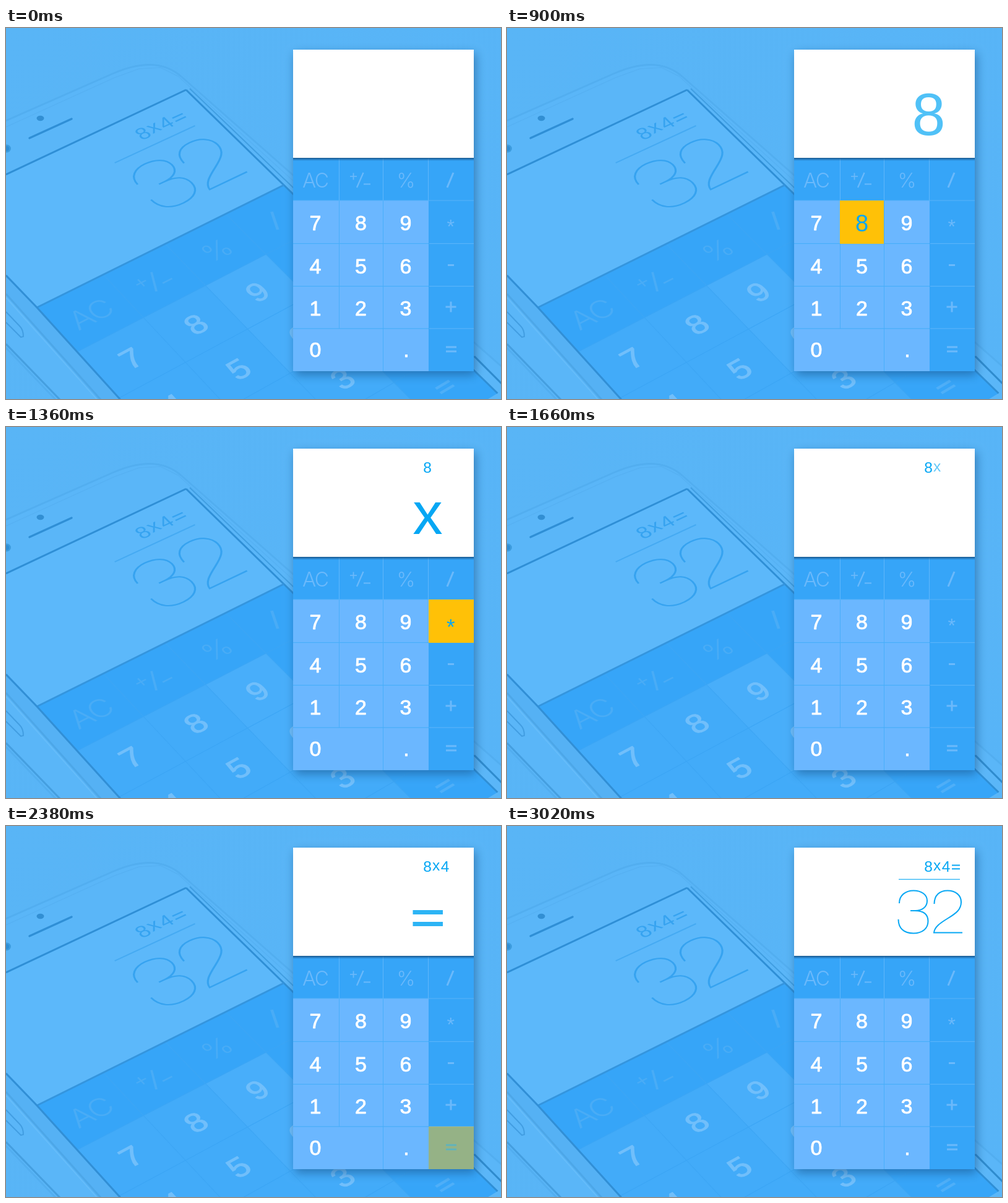
Write an HTML page with a canvas that moves like this. It is 800 px wide and 600 px high and loops after 3580 ms.

```html
<!DOCTYPE html>
<html lang="en">
<head>
<meta charset="utf-8">
<title>Calculator</title>
<style>
html, body { margin: 0; width: 100%; height: 100%; overflow: hidden; background: #58b5f7; }
canvas { display: block; width: 800px; height: 600px; }
</style>
</head>
<body>
<canvas id="stage" width="800" height="600"></canvas>
<script>
const SANS = '"Liberation Sans", Arial, sans-serif';
const LIGHT = 'Inter, "Liberation Sans", sans-serif';
const OP = '#36a5f8', NUM = '#6bb7ff', FAINT = '#6bb9fb', INK = '#06a7f4', AMBER = '#ffc107';
const LOOP = 3580;

const stage = document.getElementById('stage').getContext('2d');
const scene = document.createElement('canvas');
scene.width = 800;
scene.height = 600;
let c = scene.getContext('2d');

function text(s, x, y, size, color, bold = 0, font = SANS, weight = 400) {
  c.font = `${weight} ${size}px ${font}`;
  c.textAlign = 'center';
  c.textBaseline = 'alphabetic';
  c.fillStyle = c.strokeStyle = color;
  c.fillText(s, x, y);
  if (bold) {
    c.lineWidth = bold;
    c.lineJoin = 'round';
    c.strokeText(s, x, y);
  }
}

function rect(x, y, w, h, color) {
  c.fillStyle = color;
  c.fillRect(x, y, w, h);
}

function trace(points, close) {
  c.beginPath();
  points.forEach(([x, y], i) => i ? c.lineTo(x, y) : c.moveTo(x, y));
  if (close) c.closePath();
}

function line(points, color, width) {
  trace(points);
  c.strokeStyle = color;
  c.lineWidth = width;
  c.lineJoin = 'round';
  c.stroke();
}

function area(points, color) {
  trace(points, true);
  c.fillStyle = color;
  c.fill();
}

function dot(x, y, rx, ry, color) {
  c.beginPath();
  c.ellipse(x, y, rx, ry, 0, 0, 7);
  c.fillStyle = color;
  c.fill();
}

// Thin result digits in card coordinates
function result(color, width) {
  c.strokeStyle = color;
  c.lineWidth = width;
  c.lineJoin = 'miter';
  c.stroke(new Path2D('M634 125C634 112 644 104.5 657 104.5C670 104.5 679 111 679 121' +
    'C679 131 671 137 659 137L652 137L659 137C673 137 680.5 143 680.5 154' +
    'C680.5 166 671 173.5 657 173.5C641 173.5 632.5 165 632.5 151'));
  c.stroke(new Path2D('M690.5 126C690.5 112 699 104.5 712 104.5C725 104.5 734 112 734 123' +
    'C734 135 726 141 713 149C700 157 691 163 690 172.5L736 172.5'));
}

// Characters of the small formula, each on its own centre
const formula = [
  color => text('8', 681, 74, 24.5, color),
  color => text('x', 695, 72, 24.5, color),
  color => text('4', 709.5, 74, 24.5, color),
  color => { rect(719, 62.5, 13, 2, color); rect(719, 68.3, 13, 2, color); }
];

// Perspective from the card onto the phone screen
function proj(x, y) {
  const u = x - 756, v = y - 35, d = 1 + 0.00025 * u - 0.0001836 * v;
  return [(1.335 * u + 0.8204 * v + 291) / d, (-0.5433 * u + 0.8334 * v + 100) / d];
}

function onPhone(x, y, draw) {
  const [px, py] = proj(x, y), [ax, ay] = proj(x + 1, y), [bx, by] = proj(x, y + 1);
  c.save();
  c.transform(ax - px, ay - py, bx - px, by - py, px, py);
  c.translate(-x, -y);
  draw();
  c.restore();
}

const quad = (x0, y0, x1, y1) => [proj(x0, y0), proj(x1, y0), proj(x1, y1), proj(x0, y1)];

const digits = [
  ['7', 500, 327], ['8', 573.5, 327], ['9', 646, 327],
  ['4', 500, 397], ['5', 573.5, 397], ['6', 646, 397],
  ['1', 500, 465], ['2', 573.5, 465], ['3', 646, 465],
  ['0', 500, 532], ['.', 647, 532]
];

function letters(color) {
  text('A', 490, 258, 33, color, 0, LIGHT, 300);
  text('C', 510.5, 258, 32, color, 0, LIGHT, 300);
}

function plusMinus(color) {
  line([[556, 240], [567, 240]], color, 1.7);
  line([[561.5, 234.5], [561.5, 245.5]], color, 1.7);
  line([[567, 258], [577.5, 234]], color, 2.3);
  line([[578, 252.5], [589, 252.5]], color, 2);
}

const percent = color => text('%', 646.5, 258, 32, color, 0, LIGHT, 300);
const slash = color => line([[713, 258], [723, 234]], color, 3);
const star = (color, size = 32) => text('*', 718.7, 310 + size * 0.7, size, color);

function equals(color) {
  rect(711, 514.5, 17, 3, color);
  rect(711, 521.5, 17, 3, color);
}

function drawPhone() {
  const edge = '#2f8fd6', soft = '#4da7e8';
  const sky = c.createLinearGradient(0, 0, 800, 600);
  sky.addColorStop(0, '#59b5f6');
  sky.addColorStop(1, '#57b4f7');
  rect(0, 0, 800, 600, sky);

  // Body
  c.fillStyle = '#5ab6f8';
  c.strokeStyle = '#52aef0';
  c.lineWidth = 3;
  const body = new Path2D('M-5 152L172 74C215 55 255 52 285 80L464 238L757 509L805 551V605H84L-5 512Z');
  c.fill(body);
  c.stroke(body);
  line([[0, 160], [176, 80], [215, 66], [250, 64], [278, 78], [464, 247]], '#56b1f3', 1.5);

  // Lower left side and its button
  area([[0, 402], [50, 452], [187, 602], [150, 602], [0, 432]], '#55b1f4');
  line([[0, 430], [60, 497], [154, 602]], soft, 3);
  line([[0, 436], [150, 604]], '#67bdfa', 1.5);
  line([[0, 511], [88, 602]], '#459fe0', 3);
  c.strokeStyle = '#429ee2';
  c.lineWidth = 2;
  c.stroke(new Path2D('M0 459L22 482Q28 488 28 499L24 500L0 476'));

  // Screen
  area([[0, 237], [291, 100], [449, 254], [50, 452], [0, 400]], '#5cb8fa');
  area(quad(464, 210, 756, 556), OP);
  area(quad(464, 279, 683, 556), '#42abf9');
  area(quad(610, 279, 683, 418), '#48aefa');
  for (const x of [538, 610, 683]) line([proj(x, 210), proj(x, 556)], '#3da6f5', 1.2);
  for (const y of [279, 349, 418, 486]) line([proj(464, y), proj(756, y)], '#3ba5f5', 1.2);

  line([[0, 237], [291, 100]], edge, 3);
  line([[291, 100], [449, 254], proj(756, 556)], edge, 3);
  line([[297, 98], [464, 258], [757, 532], [802, 577]], '#419fe2', 2);
  line([proj(464, 210), proj(756, 210)], '#3495de', 3);
  line([[0, 400], [50, 452], proj(464, 380)], '#318fd6', 3);
  line([[757, 531], [802, 576]], '#2f8bce', 3);

  // Camera, sensor and speaker
  dot(1, 195, 7, 6.5, '#3d9cde');
  dot(1, 195, 4, 4, edge);
  dot(55.5, 146, 6, 4.2, '#328fd3');
  c.lineCap = 'round';
  line([[38, 178], [106, 147]], edge, 3.4);
  c.lineCap = 'butt';

  // Screen content
  const glow = '#71bffb', dim = '#49acf6', ink = '#36a3f0';
  [681, 695, 709, 725].forEach((x, i) => onPhone(x, 66, () => formula[i](ink)));
  line([proj(633, 86), proj(732, 86)], '#45aaf2', 2);
  onPhone(684, 140, () => result(ink, 2));
  onPhone(500, 246, () => letters(dim));
  onPhone(573, 246, () => plusMinus(dim));
  onPhone(646, 246, () => percent(dim));
  onPhone(718, 246, () => slash(dim));
  for (const [s, x, y] of digits) onPhone(x, y - 12, () => text(s, x, y, 34, glow, 0.8));
  onPhone(719, 519, () => equals('#4eaff8'));
}

function drawCard() {
  c.save();
  c.shadowColor = 'rgba(15,65,115,.5)';
  c.shadowBlur = 15;
  c.shadowOffsetX = 3;
  c.shadowOffsetY = 6;
  rect(464, 35, 292, 520, OP);
  c.restore();
  rect(464, 279, 219, 276, NUM);

  for (const x of [538, 609, 682]) rect(x, 211, 1, 68, '#5fb6fb');
  rect(538, 279, 1, 207, '#48aefa');
  rect(609, 279, 1, 276, '#48aefa');
  for (const y of [348, 417, 485.5]) {
    rect(464, y, 219, 1.2, '#48aefa');
    rect(684, y, 72, 1.2, '#58b3fa');
  }
  rect(464, 278.5, 292, 1, '#58b3fa');

  rect(464, 35, 292, 175, '#fff');
  const shade = c.createLinearGradient(0, 210, 0, 215);
  shade.addColorStop(0, 'rgba(15,60,105,.75)');
  shade.addColorStop(1, 'rgba(15,60,105,0)');
  rect(464, 210, 292, 5, shade);

  letters(FAINT);
  plusMinus(FAINT);
  percent(FAINT);
  slash(FAINT);
  star(FAINT);
  rect(714, 382, 10, 3, FAINT);
  rect(710.5, 449.5, 17, 3, FAINT);
  rect(717.5, 442.5, 3, 17, FAINT);
  equals(FAINT);
  for (const [s, x, y] of digits) text(s, x, y, 34, '#fff', 0.9);
}

drawPhone();
drawCard();
c = stage;

const ramp = (t, from, to) => Math.min(1, Math.max(0, (t - from) / (to - from)));
const pulse = (t, start, fadeIn, hold, end) =>
  ramp(t, start, start + fadeIn) * (1 - ramp(t, start + hold, start + end));

function fade(alpha, draw) {
  if (alpha <= 0) return;
  c.globalAlpha = alpha;
  draw();
  c.globalAlpha = 1;
}

const big = s => text(s, 681.5, 173, 97, INK);
const presses = [
  { key: 600, show: 600, box: [538, 279, 71, 70],
    label: () => text('8', 573.5, 329, 38, INK), entry: () => big('8') },
  { key: 1140, show: 1140, box: [683, 279, 73, 70],
    label: () => star(INK, 35), entry: () => big('x') },
  { key: 1680, show: 1680, box: [464, 349, 74, 69],
    label: () => text('4', 500, 399, 38, INK), entry: () => big('4') },
  { key: 2285, show: 2240, box: [683, 486, 73, 69],
    label: () => equals(INK),
    entry: () => { rect(657.5, 136, 48.5, 7, INK); rect(657.5, 155, 48.5, 7, INK); } }
];
const formulaStart = [1140, 1560, 2040, 2600];

function render(t) {
  c.drawImage(scene, 0, 0);
  for (const p of presses) {
    fade(pulse(t, p.key, 200, 320, 520), () => {
      rect(...p.box, AMBER);
      p.label();
    });
    fade(pulse(t, p.show, 165, 240, 440), p.entry);
  }
  formula.forEach((draw, i) => fade(ramp(t, formulaStart[i], formulaStart[i] + 160), () => draw(INK)));
  fade(ramp(t, 2780, 3020), () => {
    rect(633, 85.7, 99, 1.1, INK);
    result(INK, 2);
  });
}

let begin;
function tick(now) {
  begin ??= now;
  render((now - begin) % LOOP);
  requestAnimationFrame(tick);
}
requestAnimationFrame(tick);
</script>
</body>
</html>
```
